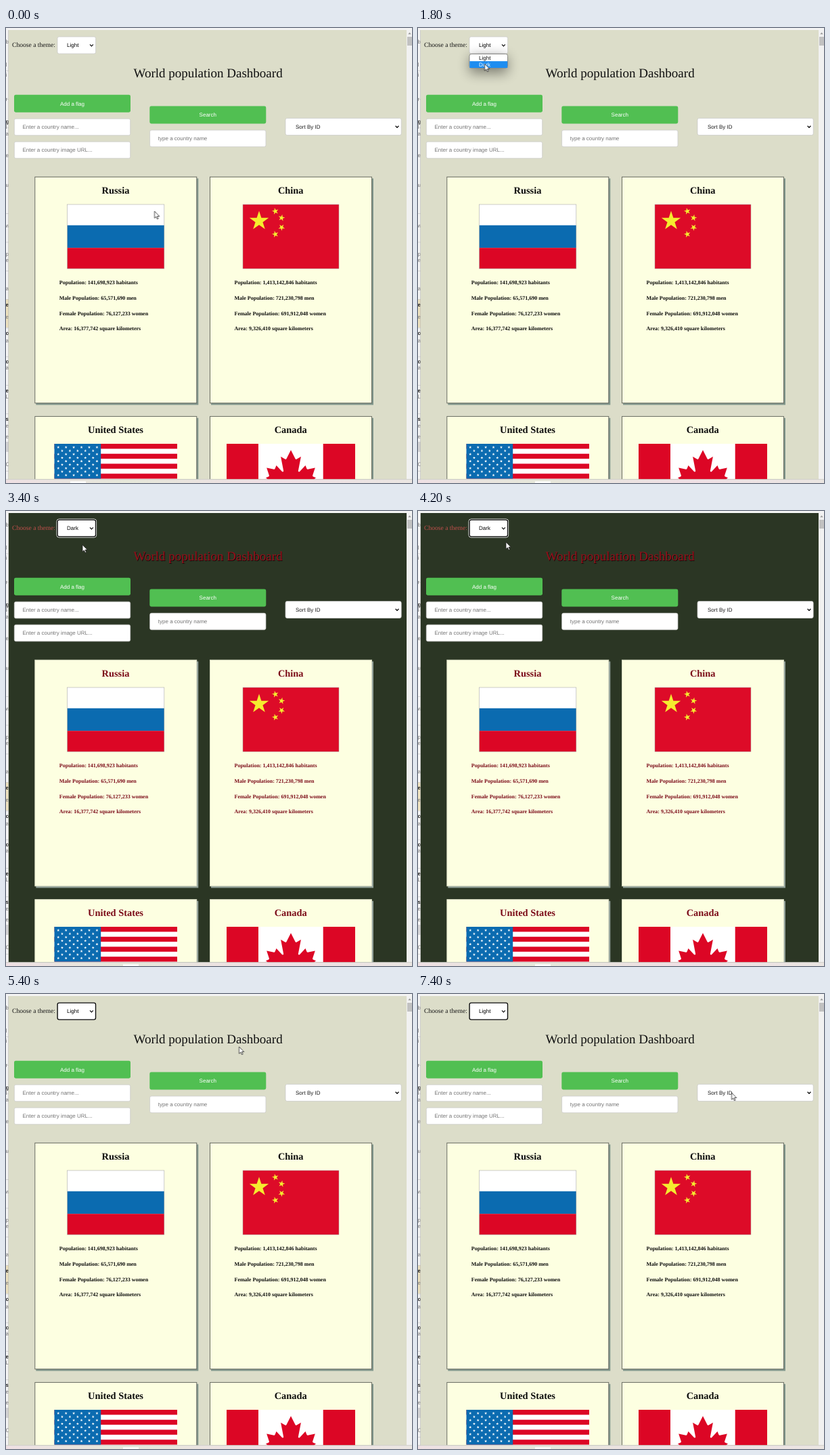
Recreate the animation shown at these times as an HTML page. Size 600x673 px, loop 8000 ms.

```html
<!DOCTYPE html>
<html lang="en">
<head>
<meta charset="utf-8">
<title>World population Dashboard</title>
<style>
html, body { margin: 0; width: 100%; height: 100%; overflow: hidden; background: #f4f4f4; }
svg {
  display: block; width: 600px; height: 673px;
  --page: #dcddc9; --label: #151515; --title: #111; --shade: transparent; --ink: #0c0c0c;
  --edge: #5c5f58; --drop: #82978c; --halo: transparent;
  --light: 1; --dark: 0; --open: 0; --ring: 0; --hl: 0px; --opt1: #fff; --opt2: #111;
  --search: #51bf52; --tab: 95px;
  animation: state 8s step-end infinite;
  text-rendering: geometricPrecision;
}
.serif { font-family: "Liberation Serif", "Times New Roman", serif; }
.sans { font: 8px "Liberation Sans", Arial, sans-serif; }
.mid { text-anchor: middle; }
.bold { font-weight: bold; }
.hint { fill: #757575; }
.box { fill: #fff; stroke: #c8c8c8; stroke-width: .7; }
.card { fill: #fdffe1; stroke: var(--edge); stroke-width: .9; }
.shadow { fill: var(--drop); }
.ink { fill: var(--ink); }
.light { opacity: var(--light); }
.dark { opacity: var(--dark); }
.open { opacity: var(--open); }
.ring { opacity: var(--ring); fill: none; }
.mark { transform: translateY(var(--hl)); fill: #1e8df0; }
.tab { transform: translateX(var(--tab)); }
.cursor { animation: move 8s step-end infinite; }

@keyframes state {
  7.5% { --tab: 173px; }
  17.5% { --open: 1; --ring: 0; --hl: 0px; --opt1: #fff; --opt2: #111; }
  22.5% { --hl: 10px; --opt1: #111; --opt2: #fff; }
  25% {
    --page: #2b3624; --label: #c2504c; --title: #98101b; --shade: #140808; --ink: #7b0a18;
    --edge: #d9dcc4; --drop: #909f98; --halo: #fff;
    --light: 0; --dark: 1; --open: 0; --ring: 1;
  }
  57.5% { --open: 1; --ring: 0; --hl: 10px; --opt1: #111; --opt2: #fff; }
  60% { --hl: 0px; --opt1: #fff; --opt2: #111; }
  67.5% {
    --page: #dcddc9; --label: #151515; --title: #111; --shade: transparent; --ink: #0c0c0c;
    --edge: #5c5f58; --drop: #82978c; --halo: transparent;
    --light: 1; --dark: 0; --open: 0; --ring: 1;
  }
  82.5% { --search: #45a049; }
  87.5% { --search: #51bf52; }
  /* properties set once hold to the end of the loop */
  99.99% { --tab: 173px; --ring: 1; --open: 0; --search: #51bf52; --hl: 0px; --opt1: #fff; --opt2: #111;
    --page: #dcddc9; --label: #151515; --title: #111; --shade: transparent; --ink: #0c0c0c;
    --edge: #5c5f58; --drop: #82978c; --halo: transparent; --light: 1; --dark: 0; }
}
@keyframes move {
  0% { transform: translate(219.5px, 271px); }
  2.5% { transform: translate(212px, 250px); }
  5% { transform: translate(190px, 198px); }
  7.5% { transform: translate(155px, 125px); }
  10% { transform: translate(125px, 66px); }
  12.5% { transform: translate(110px, 36px); }
  15%, 17.5% { transform: translate(104px, 28px); }
  20% { transform: translate(100px, 44px); }
  22.5%, 27.5% { transform: translate(98.5px, 53px); }
  30% { transform: translate(100px, 53px); }
  32.5% { transform: translate(104px, 52px); }
  35% { transform: translate(109px, 51px); }
  37.5% { transform: translate(112px, 50px); }
  42.5% { transform: translate(113px, 50px); }
  45% { transform: translate(150px, 84px); }
  47.5% { transform: translate(204px, 124px); }
  50% { transform: translate(170px, 88px); }
  52.5% { transform: translate(130px, 46px); }
  55%, 57.5% { transform: translate(112px, 28px); }
  60% { transform: translate(109px, 38px); }
  62.5% { transform: translate(107.5px, 40px); }
  67.5% { transform: translate(344.5px, 78px); }
  70% { transform: translate(348px, 82px); }
  75% { transform: translate(344px, 85px); }
  80% { transform: translate(326px, 102px); }
  82.5% { transform: translate(306px, 122px); }
  85% { transform: translate(336px, 135px); }
  87.5% { transform: translate(400px, 144px); }
  90% { transform: translate(478px, 153px); }
  92.5%, 100% { transform: translate(463.5px, 146px); }
}
</style>
</head>
<body>
<svg id="stage" viewBox="0 0 600 673"></svg>
<script>
const RED = '#dc0625', BLUE = '#0b6bb0';

const rect = (x, y, w, h, attrs = '') =>
  `<rect x="${x}" y="${y}" width="${w}" height="${h}" ${attrs}/>`;
const fill = (x, y, w, h, color) => rect(x, y, w, h, `fill="${color}"`);
const text = (x, y, s, cls, attrs = '') =>
  `<text x="${x}" y="${y}" class="${cls}" ${attrs}>${s}</text>`;

function star(cx, cy, r, turn, color) {
  const pts = Array.from({ length: 10 }, (_, i) => {
    const a = turn - Math.PI / 2 + i * Math.PI / 5, d = i % 2 ? r * .382 : r;
    return (cx + d * Math.cos(a)).toFixed(2) + ',' + (cy + d * Math.sin(a)).toFixed(2);
  });
  return `<polygon points="${pts.join(' ')}" fill="${color}"/>`;
}

const chevron = (x, y) =>
  `<path d="M${x - 2.4} ${y - 1.2}l2.4 2.5 2.4-2.5" fill="none" stroke="#111" stroke-width="1.3"/>`;
const field = (x, y, w, h) => rect(x, y, w, h, 'rx="2.4" class="box"');
const input = (x, y, hint) => field(x, y, 171.4, 24.6) + text(x + 12.2, y + 15.1, hint, 'sans hint');
const button = (x, y, label, color) =>
  rect(x, y, 172, 26, `rx="2.4" style="fill:${color}"`) +
  text(x + 86, y + 15.8, label, 'sans mid', 'fill="#fff"');

function russia() {
  return fill(90.5, 261, 143.5, 31, '#fff') + fill(90.5, 291.8, 143.5, 33.4, BLUE) +
    fill(90.5, 325.2, 143.5, 30.8, RED) +
    rect(90.5, 261, 143.3, 95, 'fill="none" stroke="#aaa" stroke-width=".6"');
}

function china() {
  const small = [[398, 271], [407.3, 280.8], [407.3, 295], [398, 305]];
  return fill(350, 261, 142, 95, '#dd0b28') + star(374, 285.4, 15, 0, '#f5ec2f') +
    small.map(([x, y]) => star(x, y, 5.1, Math.atan2(285 - y, 374 - x) - Math.PI / 2, '#f5ec2f')).join('') +
    rect(350, 261, 142, 95, 'fill="none" stroke="#aaa" stroke-width=".5"');
}

function usa() {
  const x = 71.5, y = 615, w = 181.5, step = 7.37;
  let out = fill(x, y, w, 60, '#fff');
  for (let i = 0; i < 13; i += 2) out += fill(x, y + i * step, w, step, RED);
  out += fill(x, y, 68.7, step * 7, BLUE);
  for (let row = 1; row < 10; row++)
    for (let col = 1; col < 12; col++)
      if ((row + col) % 2 === 0) out += star(x + col * 5.72, y + row * 5.16, 2.2, 0, '#fff');
  return out;
}

function canada() {
  const half = 'M0 4430h90l-45-863a95 95 0 0 1 111-98l859 151-116-320a65 65 0 0 1 20-73l941-762-212-99' +
    'a65 65 0 0 1-34-79l186-572-542 115a65 65 0 0 1-73-38l-105-247-423 454a65 65 0 0 1-111-57' +
    'l204-1052-327 189a65 65 0 0 1-91-27l-332-652z';
  const side = s => `<path d="${half}" transform="translate(421 616.3) scale(${s * .0199} .0199)" fill="${RED}"/>`;
  return fill(326, 615, 190, 60, RED) + fill(373, 615, 95.7, 60, '#fff') + side(1) + side(-1);
}

function card(x, y, name, flag, stats = []) {
  return rect(x + 2, y + 2.5, 240, 335, 'class="shadow"') +
    rect(x + .5, y + .3, 239, 334.5, 'class="card"') +
    text(x + 119.7, y + 25, name, 'serif bold mid ink', 'font-size="14.4"') + flag +
    stats.map((s, i) => text(x + 36.5, y + 159.2 + i * 22.75, s, 'serif bold ink', 'font-size="8"')).join('');
}

const stats = (all, men, women, area) => [
  `Population: ${all} habitants`, `Male Population: ${men} men`,
  `Female Population: ${women} women`, `Area: ${area} square kilometers`];

// sliver of the window behind the page
function backWindow() {
  let out = fill(0, 0, 600, 673, '#f4f4f4') + fill(0, 401, 5, 42, '#ece0bd');
  for (let y = 20.5; y < 660; y += 42.3) out += fill(0, y, 5, .7, '#c9c9c9');
  out += fill(0, 612, 5, 15, '#d2d2d4');
  const rows = { 23: 'b', 57: 'l', 72: 'i', 108: 'r', 149: 'l', 159: 'a', 191: 'e', 235: 'u', 295: 'w',
    337: 'p', 346: 'e', 388: 'a', 430: 'e', 465: 'a', 505: 'a', 548: 'L', 591: 'e', 607: 'e', 648: 'O' };
  const heads = { 141: 'g', 412: 'e', 454: 'o', 496: 'o', 539: 'e', 581: 's' };
  for (const y in rows) out += text(-.5, y, rows[y], 'sans', 'fill="#777"');
  for (const y in heads) out += text(-.5, y, heads[y], 'sans bold', 'fill="#222"');
  return out + fill(3.4, 3, .8, 665, '#b5b5b0');
}

const heading = (x, y, color) =>
  text(x, y, 'World population Dashboard', 'serif mid', `font-size="19" style="fill:var(${color})"`);

const header =
  text(9, 28.4, 'Choose a theme:', 'serif', 'font-size="9.6" style="fill:var(--label)"') +
  heading(299.2, 73.8, '--shade') + heading(298.6, 73, '--title') +
  button(12, 98.7, 'Add a flag', '#51bf52') +
  input(12.3, 134.2, 'Enter a country name...') +
  input(12.3, 168.2, 'Enter a country image URL...') +
  button(212.3, 115.5, 'Search', 'var(--search)') +
  input(212.6, 151.1, 'type a country name') +
  field(413, 133.5, 171.2, 25) + text(428, 148.8, 'Sort By ID', 'sans', 'fill="#1c1c1c"') + chevron(578, 146);

const select =
  field(76, 13, 56.6, 25) +
  text(90, 28.3, 'Light', 'sans light') + text(90, 28.3, 'Dark', 'sans dark') + chevron(126.4, 25.6) +
  `<g class="ring">${rect(75, 12, 58.6, 27, 'rx="3.4" style="stroke:var(--halo)"')}
    ${rect(76.1, 13.1, 56.4, 24.8, 'rx="2.6" stroke="#101010" stroke-width="1.4"')}</g>`;

const menu = `<g class="open">
  ${rect(76, 42, 56.5, 25, 'rx="4" fill="#000" opacity=".42" filter="url(#soft)"')}
  ${rect(76, 38.4, 56.5, 20.8, 'rx="3" fill="#fff" stroke="#666" stroke-width=".7"')}
  ${rect(76.3, 39.1, 55.9, 9.9, 'class="mark"')}
  ${text(90, 46.6, 'Light', 'sans', 'style="fill:var(--opt1)"')}
  ${text(90, 56.6, 'Dark', 'sans', 'style="fill:var(--opt2)"')}</g>`;

const chrome =
  fill(592, 3, 8, 665, '#f1f1f1') + fill(593, 13, 7, 13, '#c1c1c1') +
  '<path d="M594.3 9.3l2.2-2.8 2.2 2.8z" fill="#999"/>' +
  fill(0, 667.3, 600, 1.2, '#c9c8c2') + fill(0, 668.5, 600, 4.5, 'url(#bar)') +
  rect(0, 670.5, 23, 2.5, 'fill="#fff" class="tab"');

document.getElementById('stage').innerHTML = `
  <defs>
    <filter id="soft" x="-100%" y="-150%" width="300%" height="400%"><feGaussianBlur stdDeviation="9"/></filter>
    <linearGradient id="bar"><stop stop-color="#efe0e4"/><stop offset=".3" stop-color="#e6e8da"/>
      <stop offset=".65" stop-color="#f0dfe5"/><stop offset="1" stop-color="#ebe6e2"/></linearGradient>
    <clipPath id="view">${rect(4, 3, 588, 664.5)}</clipPath>
  </defs>
  ${backWindow()}
  <g clip-path="url(#view)">
    ${rect(4, 3, 588, 665, 'style="fill:var(--page)"')}
    ${header}
    ${card(42.3, 220, 'Russia', russia(), stats('141,698,923', '65,571,690', '76,127,233', '16,377,742'))}
    ${card(301, 220, 'China', china(), stats('1,413,142,846', '721,230,798', '691,912,048', '9,326,410'))}
    ${card(42.3, 574.3, 'United States', usa())}
    ${card(301, 574.3, 'Canada', canada())}
    ${select}${menu}
  </g>
  ${chrome}
  <path class="cursor" d="M0 0v10.3l2.4-2.2 1.6 3.6 1.6-.7-1.6-3.5h3.2z" fill="#fff" stroke="#222" stroke-width=".8"/>`;
</script>
</body>
</html>
```
